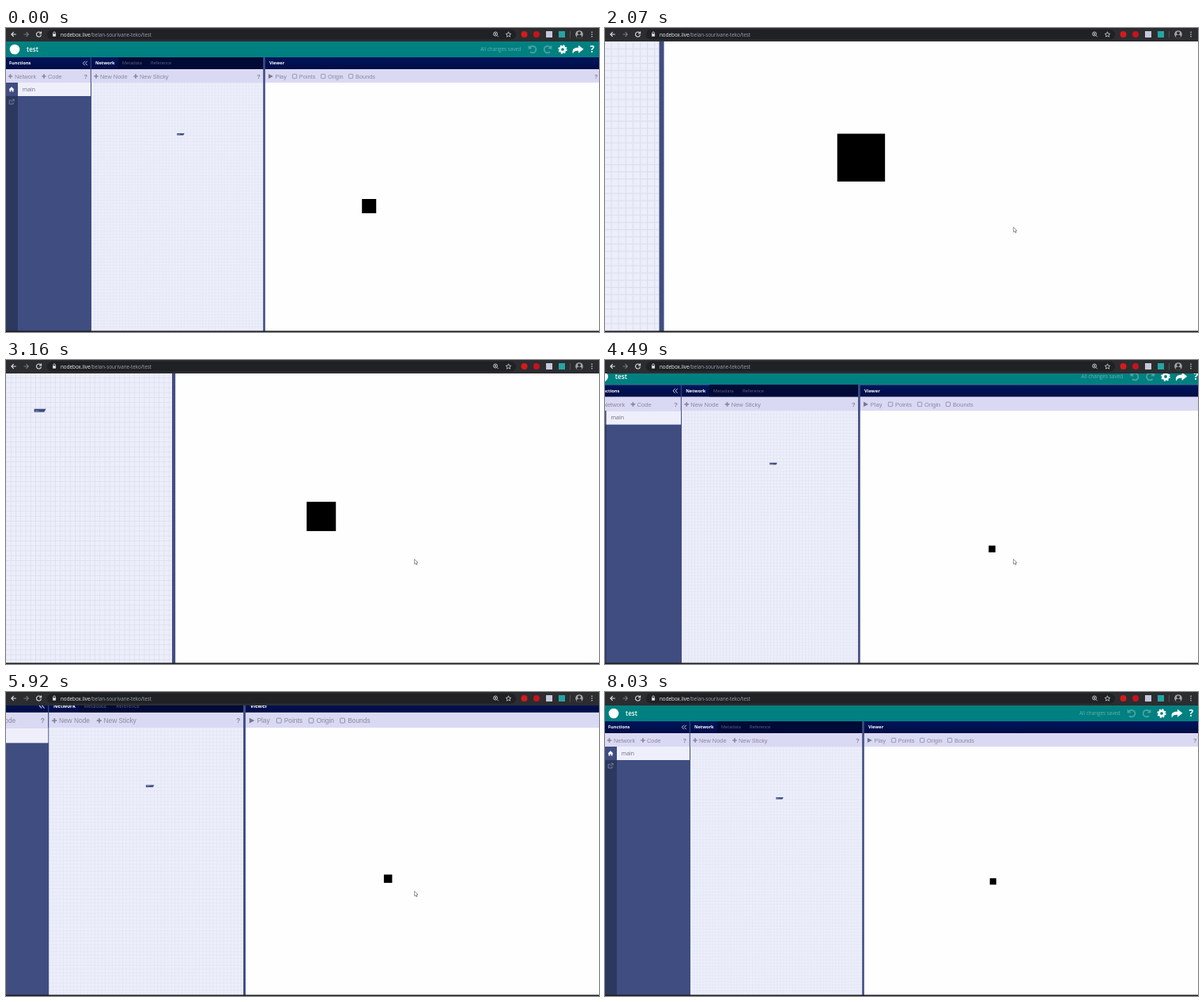
An HTML page that plays this animation: 750 px wide and 384 px high, repeating every 8930 ms.

```html
<!DOCTYPE html>
<html lang="en">
<head>
<meta charset="utf-8">
<title>Zooming a node editor</title>
<style>
  html, body { margin: 0; width: 100%; height: 100%; overflow: hidden; background: #fefefe; }
  svg { display: block; width: 100vw; height: 100vh; }
  text { white-space: pre; }
  .ui { font-family: "Open Sans", "Noto Sans", sans-serif; }
  .tab { font: 5.6px "Open Sans", "Noto Sans", sans-serif; fill: #62657d; }
  .on { font-weight: 700; fill: #fff; }
  .tool { font: 7.4px "Liberation Sans", Arial, sans-serif; fill: #8a899c; }
  .help { font-weight: 700; }
  .line { fill: none; stroke: currentColor; }
</style>
</head>
<body>
<svg viewBox="0 0 750 384">
  <defs>
    <pattern id="grid" x="108" y="69" width="3.9" height="3.9" patternUnits="userSpaceOnUse">
      <rect width="3.9" height="3.9" fill="#eceefa"/>
      <path d="M0 .25H3.9M.25 0V3.9" stroke="#dcdff0" stroke-width=".5"/>
    </pattern>
    <linearGradient id="navy" x2="0" y2="1">
      <stop stop-color="#00165c"/><stop offset="1" stop-color="#000c45"/>
    </linearGradient>
    <path id="plus" d="M0-2.7V2.7M-2.7 0H2.7" stroke="#8a899c" stroke-width="1.7"/>
    <rect id="box" width="5.2" height="5.2" y="58.4" rx=".8" fill="none" stroke="#8a899c" stroke-width=".8"/>
    <g id="undo" class="line" stroke-width="1.7">
      <path d="M-3.3-2.6A4.3 4.3 0 1 1-3 3.1"/>
      <path d="M-5.4-5.4V-.6H-.6Z" fill="currentColor" stroke="none"/>
    </g>
  </defs>

  <g id="page">
    <rect y="17" width="750" height="367" fill="#fefefe"/>

    <!-- application header -->
    <rect y="17" width="750" height="20" fill="#008080"/>
    <circle cx="11" cy="27" r="6.3" fill="#fff"/>
    <text class="ui" x="26" y="30" font-size="8" font-weight="600" fill="#fff">test</text>
    <text class="ui" x="600" y="29.3" font-size="6.3" fill="#66b0b0">All changes saved</text>
    <g color="#4da3a3">
      <use href="#undo" x="666" y="27"/>
      <use href="#undo" transform="translate(685 27) scale(-1 1)"/>
    </g>
    <g class="line" color="#fff">
      <circle cx="704" cy="27" r="3.2" stroke-width="2.7"/>
      <circle cx="704" cy="27" r="4.9" stroke-width="1.6" stroke-dasharray="2 1.85"/>
    </g>
    <path d="M717 32.5C715.500 27 718 24.700 724 24.700V21.700L730.500 26.800L724 31.800V28.800C720.500 28.600 718.500 29 717 32.500Z" fill="#fff"/>
    <text class="ui" x="738.500" y="31.200" font-size="12" font-weight="700" fill="#fff">?</text>

    <!-- panel titles -->
    <rect y="37" width="750" height="15" fill="url(#navy)"/>
    <rect x="142" y="37" width="183" height="15" fill="#000a36"/>
    <text class="tab on" x="4" y="46.400">Functions</text>
    <path class="line" color="#d4d7e8" d="M99.800 41.800L97.300 44.500L99.800 47.200M102.800 41.800L100.300 44.500L102.800 47.200" stroke-width=".9"/>
    <text class="tab on" x="113" y="46.400">Network</text>
    <text class="tab" x="147" y="46.400">Metadata</text>
    <text class="tab" x="183" y="46.400">Reference</text>
    <text class="tab on" x="333" y="46.400">Viewer</text>

    <!-- toolbars -->
    <rect y="52" width="750" height="17" fill="#dad9f4"/>
    <use href="#plus" x="5.500" y="61"/><text class="tool" x="11" y="63.600">Network</text>
    <use href="#plus" x="48" y="61"/><text class="tool" x="53" y="63.600">Code</text>
    <text class="tool help" x="98.500" y="63.600">?</text>
    <use href="#plus" x="114" y="61"/><text class="tool" x="119" y="63.600">New Node</text>
    <use href="#plus" x="164" y="61"/><text class="tool" x="169" y="63.600">New Sticky</text>
    <text class="tool help" x="317.300" y="63.600">?</text>
    <path d="M332 58L337.800 61L332 64Z" fill="#77778a"/>
    <text class="tool" x="340.500" y="63.600">Play</text>
    <use href="#box" x="362.500"/><text class="tool" x="370.800" y="63.600">Points</text>
    <use href="#box" x="398.500"/><text class="tool" x="407" y="63.600">Origin</text>
    <use href="#box" x="433.500"/><text class="tool" x="442" y="63.600">Bounds</text>
    <text class="tool help" x="744" y="63.600">?</text>

    <!-- function list -->
    <rect y="69" width="108" height="315" fill="#404d81"/>
    <rect y="69" width="15" height="315" fill="#2d385f"/>
    <rect y="69" width="15" height="17" fill="#404d81"/>
    <rect x="15" y="69" width="92" height="17" fill="#eeeffb"/>
    <path d="M3.500 77.700L7 74.300L10.500 77.700H9.500V80.500H7.700V78.500H6.300V80.500H4.500V77.700Z" fill="#fff"/>
    <path class="line" color="#8690b0" d="M7 91.300H4.200V96H9V93.800M7.800 90.200H10.200V92.600M10 90.400L6.800 93.600" stroke-width=".8"/>
    <text class="ui" x="20.800" y="79.600" font-size="6.900" fill="#6c6c78">main</text>

    <!-- network canvas -->
    <rect x="108" y="69" width="217.200" height="315" fill="url(#grid)"/>
    <path d="M216.300 132.900H225.700L224.200 135.400H216.300Z" fill="#3f4c85"/>
    <text class="ui" x="217" y="134.700" font-size="1.500" fill="#fff">rect1</text>
    <path d="M107.300 37V69M326.500 37V384" stroke="#404d81" stroke-width="1"/>
    <path d="M326.500 37V384" stroke="#404d81" stroke-width="2.600"/>
  </g>

  <rect id="square" x="-66.400" y="-35" width="18" height="18"/>

  <!-- browser bar -->
  <rect width="750" height="17" fill="#2c2d30"/>
  <rect x="52" y="1.800" width="593" height="12.800" rx="6.400" fill="#202124"/>
  <g class="line" color="#e4e5e8" stroke-width="1.100">
    <path d="M12.800 8H7M9.700 5.200L6.900 8L9.700 10.800"/>
    <path d="M22.500 8H28.300M25.600 5.200L28.400 8L25.600 10.800" stroke="#77797d"/>
    <path d="M43.800 6A3 3 0 1 0 44.500 8.600M44.600 4.500V7H42"/>
    <path d="M59.800 7.300V6.200A1.300 1.300 0 0 1 62.400 6.200V7.300" stroke-width=".8"/>
    <rect x="59.300" y="7.500" width="3.600" height="2.900" fill="currentColor" stroke-width=".4"/>
    <path d="M621 9.500L622.700 11.200M617.800 7.500H620.200M619 6.300V8.700" stroke-width=".8"/>
    <circle cx="619" cy="7.500" r="2.500" stroke-width=".8"/>
    <path d="M635.500 4.800L636.400 7.100L638.800 7.300L637 8.800L637.600 11.200L635.500 9.900L633.400 11.200L634 8.800L632.200 7.300L634.600 7.100Z" stroke-width=".7"/>
    <path d="M713.500 4V12.500" stroke="#606266" stroke-width=".7"/>
    <path d="M741 5.300V11.500" stroke-width="1.500" stroke-linecap="round" stroke-dasharray="0 2.700"/>
  </g>
  <text class="ui" x="69" y="10.600" font-size="6.300" fill="#f1f3f4">nodebox.live<tspan fill="#9ba3b6">/belan-sourivane-teko/test</tspan></text>
  <circle cx="655.500" cy="8" r="4" fill="#d31c1c"/>
  <circle cx="671" cy="8" r="4" fill="#c4141f"/>
  <rect x="683" y="4" width="8" height="8" fill="#c6c9da"/>
  <rect x="699" y="4" width="8" height="8" fill="#25a5a5"/>
  <circle cx="725" cy="8" r="4.800" fill="#a5a5a8"/>
  <path d="M721.800 11.600A3.200 3.200 0 0 1 728.200 11.600A4.800 4.800 0 0 1 721.800 11.600Z" fill="#2b2b2e"/>
  <circle cx="725" cy="6.300" r="1.900" fill="#2b2b2e"/>

  <rect y="382.500" width="750" height="1.500" fill="#1d1e20"/>
  <path id="cursor" d="M0 0V6.200L1.500 4.900L2.500 7.200L3.500 6.700L2.500 4.500H4.400Z" fill="#fff" stroke="#555" stroke-width=".6"/>
</svg>

<script>
const LOOP = 8930;
const FOCUS = [516.6, 251]; // both zooms are centred here
const [page, square, cursor] = ["page", "square", "cursor"].map(id => document.getElementById(id));

// time, page scale, scale of the square
const zoomKeys = [
  [1490, 1, 1], [2070, 2.338, 3.35], [2440, 3.85, 6.7], [3160, 1.605, 2.06], [3390, 1, 0.96],
  [3400, 1, 0.96], [3690, 1, 0.715],
  [4070, 1, 0.715], [4410, 1, 0.455], [4490, 1.024, 0.47], [4950, 3.6, 3.1],
  [5270, 3.6, 3.1], [5350, 3.4, 2.89], [5920, 1.1315, 0.583], [6210, 1.006, 0.49], [6290, 1, 0.49],
  [6439, 1, 0.49], [6440, 1, 0.45]
];

// time, x, y
const cursorKeys = [
  [130, 678, 340], [290, 580, 286], [530, 516.6, 251.6],
  [7250, 516.6, 251.6], [7480, 560, 226.5], [7950, 701, 367]
];

// Geometric interpolation gives an even zoom speed.
function valuesAt(keys, time) {
  const next = keys.findIndex(key => key[0] > time);
  if (next === 0) return keys[0].slice(1);
  if (next < 0) return keys[keys.length - 1].slice(1);
  const [from, to] = [keys[next - 1], keys[next]];
  const progress = (time - from[0]) / (to[0] - from[0]);
  return from.slice(1).map((value, i) => value * (to[i + 1] / value) ** progress);
}

function draw() {
  const time = performance.now() % LOOP;
  const [pageScale, squareScale] = valuesAt(zoomKeys, time);
  const [x, y] = FOCUS;
  page.setAttribute("transform", `translate(${x} ${y}) scale(${pageScale}) translate(${-x} ${-y})`);
  square.setAttribute("transform", `translate(${x} ${y}) scale(${squareScale})`);
  cursor.setAttribute("transform", `translate(${valuesAt(cursorKeys, time)})`);
  cursor.setAttribute("visibility", time >= 130 && time < 8030 ? "visible" : "hidden");
  requestAnimationFrame(draw);
}
draw();
</script>
</body>
</html>
```
